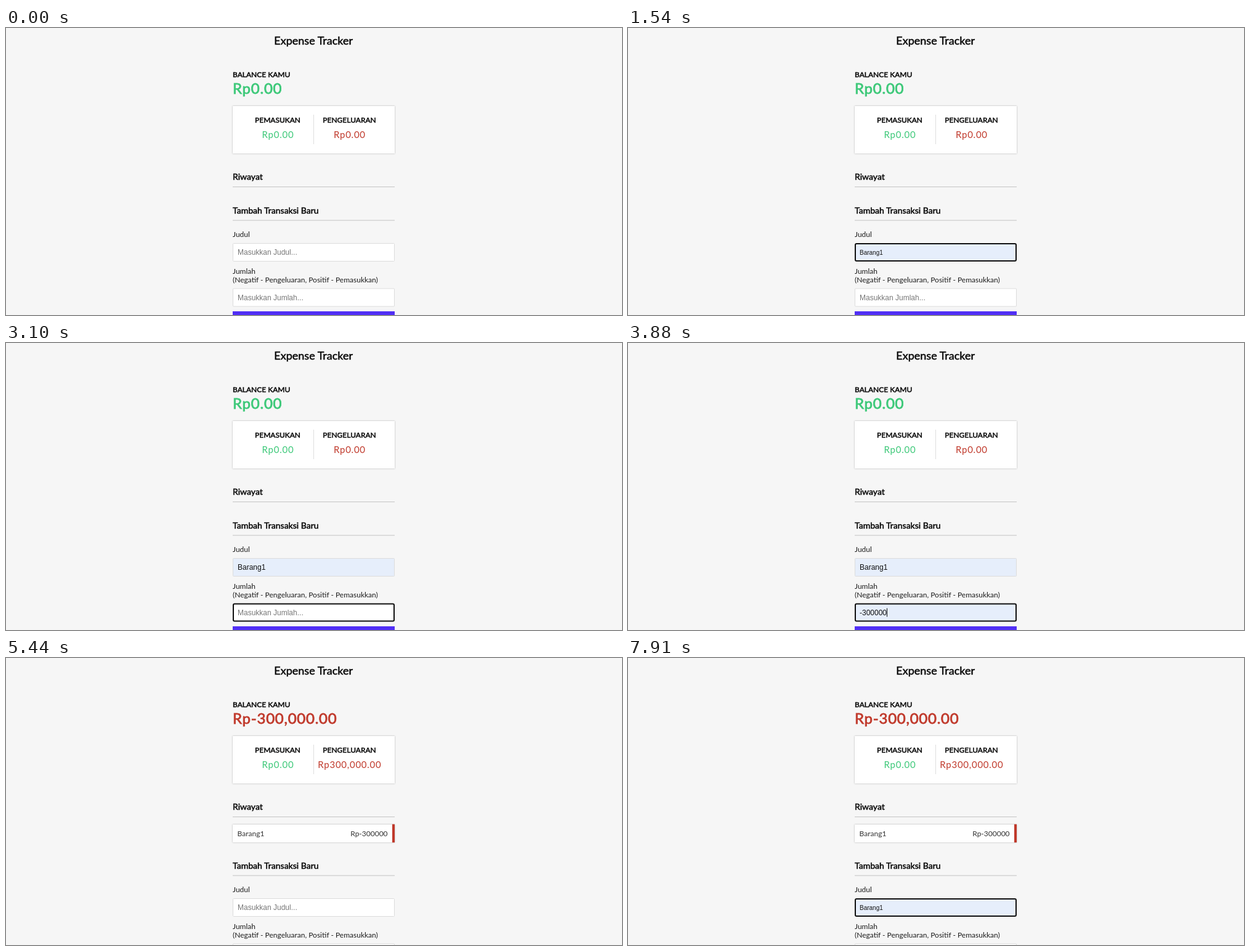
These frames come from a looping animation (1000x467 px, 8 s). An HTML page:

```html
<!DOCTYPE html>
<html lang="id">
<head>
<meta charset="utf-8">
<title>Expense Tracker</title>
<style>
html, body { margin: 0; width: 100%; height: 100%; overflow: hidden; background: #f6f6f6; }
svg { display: block; font: 12px Lato, sans-serif; fill: #1c1c1c; }
.bold { fill: #080808; stroke: #080808; stroke-width: .5px; }
.h2 { font-size: 18px; }
.h3 { font-size: 14.04px; }
.balance { font-size: 24px; letter-spacing: .75px; stroke-width: .8px; }
.money { font-size: 15px; letter-spacing: .75px; }
.mid { text-anchor: middle; }
.end { text-anchor: end; }
.item { fill: #333; }
.green { fill: #3cc878; stroke: #3cc878; }
.red { fill: #c0392b; stroke: #c0392b; }
.money.green, .money.red { stroke: none; }
.rule { fill: #c4c4c4; }
.card { fill: #fff; filter: drop-shadow(0 .75px .8px rgba(0, 0, 0, .32)); }
.field text { font-family: "Liberation Sans", Arial, sans-serif; }
</style>
</head>
<body>
<svg width="1000" height="467" viewBox="0 0 1000 467">
  <text class="bold h2 mid" x="499.2" y="27">Expense Tracker</text>
  <text class="bold" x="368" y="80.3">BALANCE KAMU</text>
  <text id="balance" x="368" y="106.5"></text>

  <rect class="card" x="368" y="127" width="263" height="77.3"/>
  <rect x="499" y="141" width="1" height="48" fill="#dedede"/>
  <text class="bold mid" x="441" y="153.8">PEMASUKAN</text>
  <text class="bold mid" x="557.5" y="153.8">PENGELUARAN</text>
  <text class="money green mid" x="441.5" y="178.6">Rp0.00</text>
  <text id="spent" class="money red mid" x="557.9" y="178.6"></text>

  <text class="bold h3" x="368" y="247.4">Riwayat</text>
  <rect class="rule" x="368" y="258" width="263" height="1"/>
  <g id="item">
    <rect class="card" x="368" y="271" width="263" height="29"/>
    <rect x="627" y="270.5" width="4" height="29.7" fill="#c0392b"/>
    <text class="item" x="375.6" y="290.2">Barang1</text>
    <text class="item end" x="619.6" y="290.2">Rp-300000</text>
  </g>

  <g id="form">
    <text class="bold h3" x="368" y="302">Tambah Transaksi Baru</text>
    <rect class="rule" x="368" y="312.5" width="263" height="1"/>
    <text x="368" y="340.3">Judul</text>
    <g id="title" class="field"></g>
    <text x="368" y="399.6">Jumlah</text>
    <text x="368" y="413.8">(Negatif - Pengeluaran, Positif - Pemasukkan)</text>
    <g id="amount" class="field"></g>
    <rect x="368" y="461" width="263" height="31" fill="#512ff5"/>
  </g>
</svg>
<script>
const LOOP = 8000, ADDED = 5310;
const $ = id => document.getElementById(id);
const within = (t, from, to) => t >= from && t < to;

// Text fields: hovering a suggestion previews it in a smaller size.
function drawField(id, top, hint, { value = "", preview, focus, caretX }) {
  const inset = focus ? 1 : .5;
  const size = preview ? 10 : 12;
  $(id).innerHTML = `
    <rect x="${368 + inset}" y="${top + inset}" width="${263 - 2 * inset}" height="${30 - 2 * inset}"
      rx="${focus ? 2 : 1}" fill="${value ? "#e6eefb" : "#fff"}"
      stroke="${focus ? "#101010" : "#dcdcdc"}" stroke-width="${2 * inset}"/>
    <text x="376" y="${top + (preview ? 18.6 : 19.2)}" font-size="${size}"
      fill="${value ? "#111" : "#777"}">${value || hint}</text>` +
    (caretX ? `<rect x="${caretX}" y="${top + 8}" width="1" height="14" fill="#111"/>` : "");
}

function titleState(t) {
  const preview = within(t, 1540, 1670) || t >= 7910;
  const picked = within(t, 1670, ADDED);
  const blink = within(t, 500, 1020) || within(t, 7260, 7780);
  return {
    value: preview || picked ? "Barang1" : "",
    preview,
    focus: within(t, 500, 2450) || t >= 7260,
    caretX: blink ? 376 : within(t, 1670, 2450) ? 421 : 0
  };
}

function amountState(t) {
  return {
    value: within(t, 3620, ADDED) ? "-300000" : "",
    preview: within(t, 3620, 3880),
    focus: within(t, 2450, 5050),
    caretX: within(t, 2450, 3100) ? 376 : within(t, 3880, 4400) ? 420 : 0
  };
}

function draw(t) {
  const added = t >= ADDED;
  $("balance").textContent = added ? "Rp-300,000.00" : "Rp0.00";
  $("balance").setAttribute("class", "balance " + (added ? "red" : "green"));
  $("spent").textContent = added ? "Rp300,000.00" : "Rp0.00";
  $("item").style.display = added ? "" : "none";
  $("form").setAttribute("transform", `translate(0 ${added ? 41 : 0})`);
  drawField("title", 350, "Masukkan Judul...", titleState(t));
  drawField("amount", 423.5, "Masukkan Jumlah...", amountState(t));
}

const start = performance.now();
function tick() {
  draw((performance.now() - start) % LOOP);
  requestAnimationFrame(tick);
}
tick();
</script>
</body>
</html>
```
